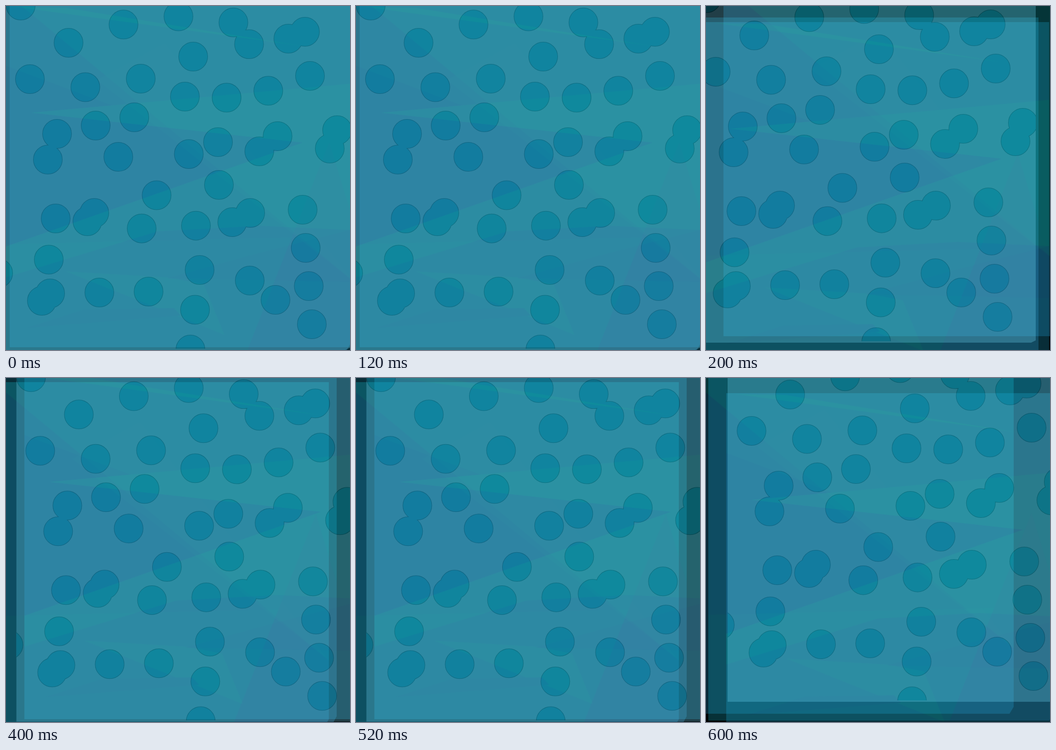
Animation, 748 px wide and 748 px high, one loop 800 ms. Source, as an HTML page:

```html
<!DOCTYPE html>
<html lang="en">
<head>
<meta charset="utf-8">
<title>Drifting sheets</title>
<style>
  html, body { margin: 0; width: 100%; height: 100%; overflow: hidden; background: #000; }
  #stage { display: block; width: 100vw; height: 100vh; }
</style>
</head>
<body>
<svg id="stage" viewBox="0 0 748 748">
  <svg id="deep" width="748" height="748" opacity=".25">
    <path fill="#24a5de" d="M0 0H748V733L739 748H0Z"/>
    <path fill="#16d2de" d="M0 0H19L748 605V0Z"/>
    <path fill="#1cdcda" fill-opacity=".4" d="M337 86L190 167L748 605Z"/>
  </svg>
  <svg id="wash" width="748" height="748" opacity=".25">
    <path fill="#20b4de" d="M0 0H748V735L741 748H0Z"/>
    <path fill="#1cc3da" d="M0 518L748 500V735L741 748H0Z"/>
    <path fill="#38a2e0" d="M703 296L525 748H741L748 735V445Z"/>
  </svg>
  <svg id="facets" width="748" height="748" opacity=".25">
    <path fill="#20b2de" d="M0 0H748V748H0Z"/>
    <path fill="#24a0de" d="M0 130L230 216L55 232L645 297L0 523Z"/>
    <path fill="#18cfd8" d="M55 232L748 169V487L550 478L330 490L0 590V523L645 297Z"/>
    <path fill="#18d4d2" d="M20 2L130 4L645 87Z"/>
    <path fill="#1cc8da" d="M130 577L350 590L430 605L475 715Z"/>
    <path fill="#24a4e0" d="M350 592L540 540L748 487V600Z"/>
    <path fill="#22a6de" d="M45 700L170 660L365 657L380 673Z"/>
  </svg>
  <svg id="dots" width="748" height="748" opacity=".28">
    <path fill="#76defd" d="M0 0H748V743L738 748H0Z"/>
    <path id="discs" fill="#12c4ec" stroke="#067088" stroke-width="2" paint-order="stroke"/>
    <path fill="#76defd" d="M360 745H440V748H360Z"/>
  </svg>
</svg>
<script>
const STEP = 200, R = 31;
const $ = id => document.getElementById(id);

const disc = (x, y) =>
  `M${x - R} ${y}a${R} ${R} 0 1 1 ${2 * R} 0a${R} ${R} 0 1 1 ${-2 * R} 0z`;

// n discs evenly spaced between two points, bowed downwards by sag.
function row(n, x0, y0, x1, y1, sag = 0) {
  let d = '';
  for (let i = 0; i < n; i++) {
    const t = i / (n - 1);
    d += disc(x0 + (x1 - x0) * t, y0 + (y1 - y0) * t + sag * Math.sin(Math.PI * t));
  }
  return d;
}

// One joined path, so overlapping discs share a single outline.
$('discs').setAttribute('d',
  row(2, 32, -1, -17, 581) +
  row(5, 136, 80, 614, 71, -53) +
  row(3, 407, 110, 650, 56) +
  row(3, 52, 159, 293, 158, 18) +
  row(4, 389, 197, 661, 152, 20) +
  row(3, 111, 278, 279, 242) +
  row(3, 461, 296, 720, 270) +
  row(5, 91, 334, 704, 310) +
  row(3, 192, 450, 463, 389, -8) +
  row(4, 177, 468, 531, 450, 25) +
  row(2, 492, 470, 531, 450) +
  row(4, 645, 443, 665, 692) +
  row(3, 108, 462, 78, 641) +
  row(3, 96, 625, 310, 621) +
  row(3, 421, 574, 401, 747) +
  row(2, 530, 597, 586, 639));

// Sheet positions at each step.
const places = {
  deep: [[8, -6], [38, -30], [-46, 9], [-79, -18]],
  wash: [[0, 0], [-25, 25], [-29, 0], [5, -3]],
  facets: [[0, 0], [-2, 35], [40, -6], [44, 33]],
  dots: [[0, 0], [-31, -16], [22.4, -0.7], [47, -44]]
};

const start = performance.now();
function draw(now) {
  const step = Math.floor(Math.max(0, now - start) / STEP) % 4;
  for (const id in places) {
    const [x, y] = places[id][step];
    $(id).setAttribute('x', x);
    $(id).setAttribute('y', y);
  }
  requestAnimationFrame(draw);
}
draw(start);
</script>
</body>
</html>
```
